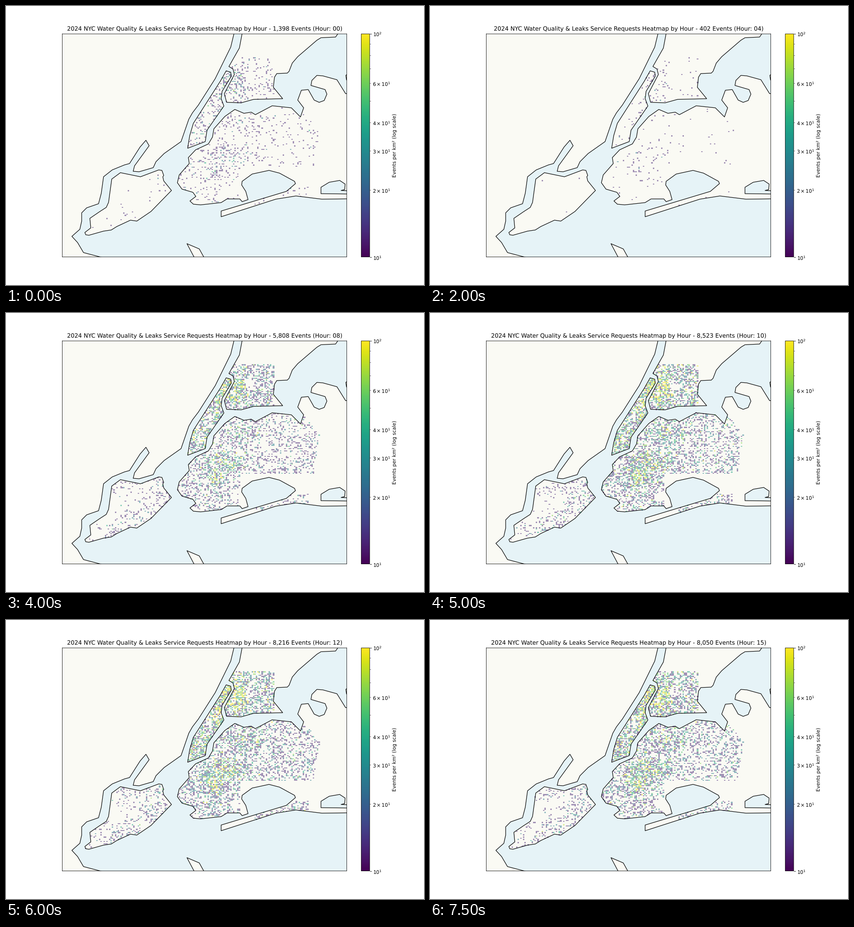
Write a matplotlib script that moves like this. It is 917 px wide and 611 px high and loops after 8 s.

```python
import matplotlib.pyplot as plt
import numpy as np
from matplotlib.animation import FuncAnimation
from matplotlib.cm import ScalarMappable
from matplotlib.colors import LogNorm
from matplotlib.patches import Polygon
from matplotlib.path import Path

W, H, DPI = 917, 611, 76.4
LEFT, RIGHT, TOP, BOTTOM = 123.4, 747.6, 61.1, 549.6
BINS = 200
HOURS = 16
CELL_DENSITY = 12.9   # one event in one cell, per km2
LAND, WATER = "#fafaf4", "#e6f3f7"

# Coast corners in stage pixels; points beyond the axes are clipped
JERSEY = [(500, 55), (500, 61), (493, 90), (459, 159), (422, 217), (409, 234),
          (401, 248), (384, 297), (347, 323), (329, 341), (323, 354),
          (292, 363), (279, 362), (282, 350), (314, 306), (307, 294),
          (294, 309), (271, 345), (260, 348), (233, 359), (214, 374),
          (209, 410), (203, 433), (177, 442), (166, 453), (166, 471),
          (162, 489), (144.5, 504.5), (157, 518), (170, 540), (212, 551),
          (100, 570), (100, 40)]
MAINLAND = [(519, 55), (512, 92), (489, 132.5), (498, 138), (501, 150),
            (479, 192), (484, 211), (516, 212), (543, 204.5), (607, 203),
            (586.5, 178), (589, 156), (594, 148), (617, 147), (621, 143),
            (628, 125), (640, 111), (682, 75), (691, 69.5), (723, 68),
            (732, 55)]
MANHATTAN = [(398.5, 311.5), (403, 284), (411, 257), (470, 165), (483, 142),
             (493, 145), (494, 154), (474, 187), (472, 203), (478, 219),
             (441, 272), (437, 297)]
STATEN = [(363, 404), (346, 383), (344, 374), (346, 371), (342, 360),
          (335, 359), (295, 374), (251, 365), (232, 379), (225, 430),
          (220, 441), (206, 450), (184, 465), (186, 486), (173, 496),
          (175, 501), (182, 502), (214, 493), (231, 490.5), (243, 483),
          (273, 469), (287, 471), (318, 450)]
NORTH_SHORE = [(780, 185), (745, 192), (726, 161.5), (695, 153), (682, 152),
               (671, 163), (669, 174), (700, 183), (704, 193), (698, 207),
               (687, 211), (676, 206), (663, 183), (648, 184.5), (640, 206),
               (653, 223), (646, 243), (626, 223), (584, 218.5), (547, 238),
               (538, 232.5), (522, 235), (502, 226.5), (480, 242), (456, 269),
               (453, 287), (444, 302), (416, 315), (400, 332), (402, 345),
               (380, 370), (376, 387), (386, 401)]
SOUTH_SHORE = [(410, 408), (416.5, 417), (403.5, 427), (411, 434),
               (427, 435.5), (472, 430.5), (485, 422.5), (513, 422.5),
               (518, 428.5), (531, 424), (526, 406), (517, 392), (518, 384),
               (540, 368), (577, 360), (600, 366), (633, 384), (635, 389),
               (615, 406), (472, 449), (472, 461.5), (592, 423), (636, 416),
               (693, 423), (780, 422)]
LONG_ISLAND = NORTH_SHORE + SOUTH_SHORE
HOOK = [(397, 520.5), (424, 532), (434, 550), (419, 562)]
POINT = [(760, 140), (745.5, 152), (747, 162), (760, 168)]
EAST_BAY = [(780, 412), (691, 411), (691, 397), (709, 386), (732, 382),
            (744, 390), (743, 402), (735, 404), (780, 406)]

# Busy spots: x, y, spread x, spread y, weight
SPOTS = [(508, 165, 14, 18, 4.5), (484, 162, 8, 13, 6), (466, 200, 9, 16, 4),
         (458, 357, 8, 10, 4.5), (485, 325, 20, 13, 2.5),
         (455, 345, 38, 40, 0.7), (530, 262, 25, 18, 1)]
# Parks: x, y, radius x, radius y
PARKS = [(533, 157, 6, 12), (447, 226, 4, 11), (514, 303, 9, 5),
         (565, 284, 6, 15), (505, 403, 11, 11), (287, 424, 11, 9),
         (232, 425, 17, 17)]

step_x, step_y = (RIGHT - LEFT) / BINS, (BOTTOM - TOP) / BINS
X, Y = np.meshgrid(LEFT + step_x * (np.arange(BINS) + 0.5),
                   TOP + step_y * (np.arange(BINS) + 0.5))


def inside(points):
    cells = np.column_stack([X.ravel(), Y.ravel()])
    return Path(points).contains_points(cells).reshape(X.shape)


def build_rates():
    """Share of events per cell, for the city proper and Staten Island."""
    texture = np.random.default_rng(2024).gamma(0.6, 1, X.shape)
    for x, y, rx, ry in PARKS:
        texture[((X - x) / rx) ** 2 + ((Y - y) / ry) ** 2 < 1] *= 0.04

    bronx = inside(MAINLAND) & (Y > 112) & (X < 588)
    limit = 688 - 0.8 * np.maximum(268 - Y, 0) - 0.15 * np.maximum(Y - 268, 0)
    brooklyn = (X < 515) & (Y < 436)
    rockaway = (X > 545) & (X < 662) & (Y > 395)
    long_island = (inside(LONG_ISLAND) & (X < limit)
                   & ((Y < 352) | brooklyn | rockaway))
    city = 1.1 * bronx + 1.5 * inside(MANHATTAN) + 0.45 * long_island
    hot = sum(w * np.exp(-((X - x) / sx) ** 2 / 2 - ((Y - y) / sy) ** 2 / 2)
              for x, y, sx, sy, w in SPOTS)
    city += (city > 0) * hot
    # Staten Island is busier toward its northern and eastern shores
    staten = inside(STATEN) * (0.5 + (X + Y > 700) + 0.5 * (Y < 385))
    return [r * texture / (r * texture).sum() for r in (city, staten)]


def total(hour):
    keys = [0, 2, 4, 6, 8, 10, 12, 15]
    events = [1398, 559, 402, 1833, 5808, 8523, 8216, 8050]
    return round(np.exp(np.interp(hour, keys, np.log(events))))


CITY_RATE, STATEN_RATE = build_rates()


def density(hour):
    rng = np.random.default_rng([7, hour])
    # Repeat requests thin out the map in quiet hours
    events = total(hour) * (total(hour) / 8600) ** 0.2
    share = 0.02 + 0.025 * (hour >= 6) + 0.045 * np.exp(-(hour - 6) ** 2)
    rate = (1 - share) * CITY_RATE + share * STATEN_RATE
    return np.ma.masked_equal(rng.poisson(events * rate), 0) * CELL_DENSITY


def place(left, right):
    return [left / W, 1 - BOTTOM / H, (right - left) / W, (BOTTOM - TOP) / H]


plt.rcParams["text.hinting"] = "no_hinting"
fig = plt.figure(figsize=((W + 1e-6) / DPI, (H + 1e-6) / DPI), dpi=DPI)
ax = fig.add_axes(place(LEFT, RIGHT), facecolor=WATER)
ax.set(xticks=[], yticks=[])
for spine in ax.spines.values():
    spine.set_snap(False)

for shore in (JERSEY, MAINLAND, MANHATTAN, STATEN, LONG_ISLAND, HOOK, POINT,
              EAST_BAY):
    fill = WATER if shore is EAST_BAY else LAND
    ax.add_patch(Polygon(shore, fc=fill, ec="none", zorder=0.5))
    ax.add_patch(Polygon(shore, fc="none", ec="black", lw=1.15,
                         joinstyle="round", zorder=2))

norm = LogNorm(10, 100)
heat = ax.imshow(density(0), cmap="viridis", norm=norm, alpha=0.5,
                 extent=(LEFT, RIGHT, BOTTOM, TOP), aspect="auto",
                 interpolation="nearest", zorder=1)
ax.set(xlim=(LEFT, RIGHT), ylim=(BOTTOM, TOP))
title = ax.set_title("")

bar = fig.colorbar(ScalarMappable(norm, "viridis"),
                   cax=fig.add_axes(place(779.3, 797.9)),
                   label="Events per km² (log scale)")
bar.outline.set_snap(False)


def update(hour):
    heat.set_data(density(hour))
    title.set_text("2024 NYC Water Quality & Leaks Service Requests Heatmap "
                   f"by Hour - {total(hour):,} Events (Hour: {hour:02d})")
    return heat, title


anim = FuncAnimation(fig, update, frames=HOURS, interval=500,
                     repeat=True, repeat_delay=0)
plt.show()
```
